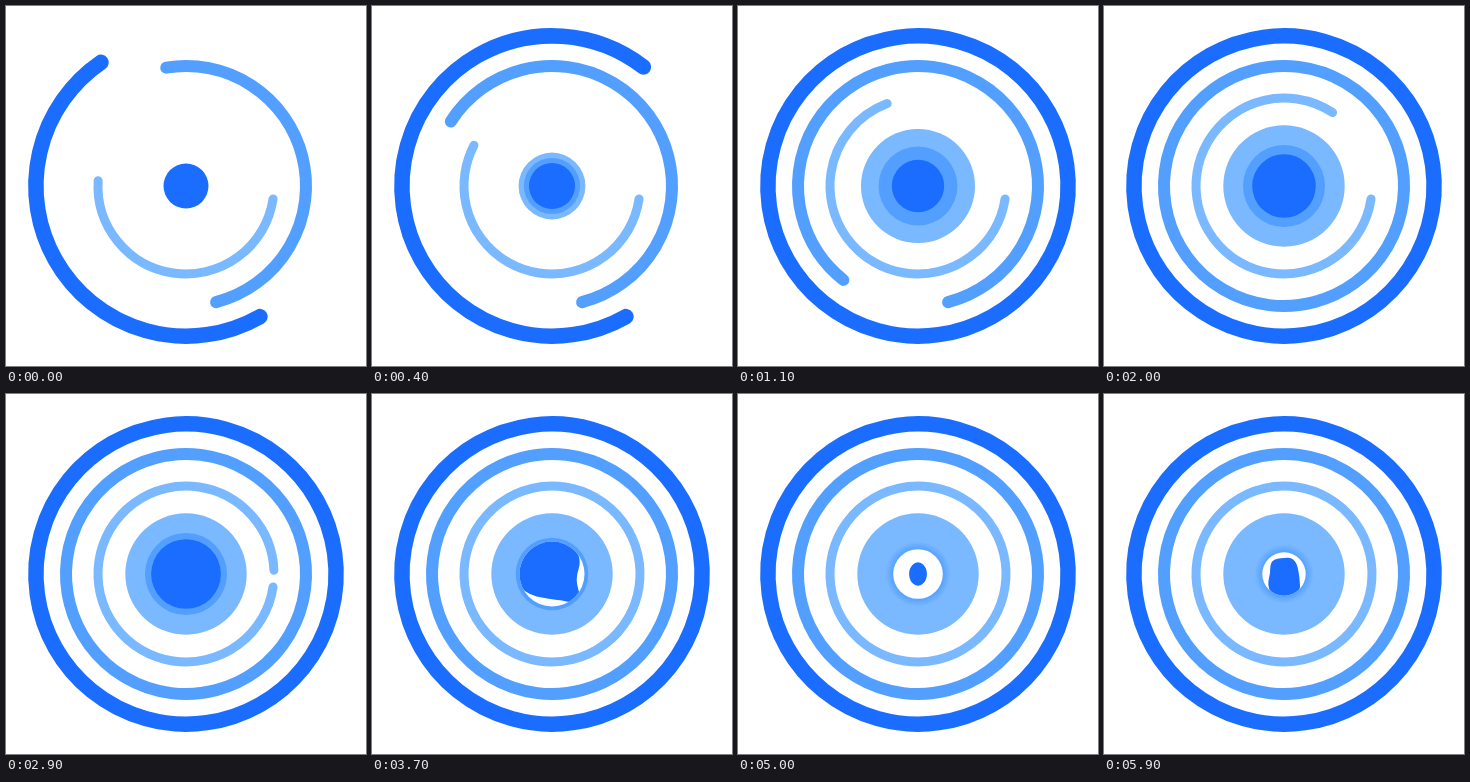
Write an HTML page with a canvas that moves like this. It is 360x360 px and loops after 6 s.

```html
<!DOCTYPE html>
<html lang="en">
<head>
<meta charset="utf-8">
<title>Rings</title>
<style>
  html, body { margin: 0; height: 100%; overflow: hidden; background: #fff; }
  canvas { display: block; width: 360px; height: 360px; }
</style>
</head>
<body>
<canvas id="stage" width="360" height="360"></canvas>
<script>
const LOOP = 6000, STEP = 100, C = 180;
const DARK = '#1a6dff', MID = '#529fff', LIGHT = '#7ab8ff';
const ctx = document.getElementById('stage').getContext('2d');
const rad = deg => deg * Math.PI / 180;
const mix = (a, b, k) => a + (b - a) * k;
const unit = (t, from, to) => Math.min(1, Math.max(0, (t - from) / (to - from)));

// Arcs sweep out from 175 degrees and keep what they have covered.
const arcs = [
  { r: 150.1, width: 15.5, color: DARK, from: 60.5, speed: 180 },
  { r: 120, width: 12, color: MID, from: 75.5, speed: -120 },
  { r: 88, width: 9, color: LIGHT, from: 8.5, speed: 60 }
];

// Core outline: time in seconds and radii at equal angles, clockwise from the right.
const shapes = [
  [3.4, Array(16).fill(36)],
  [3.7, [25, 26.5, 44, 28.5, 25.5, 25.5, 30, 35, 35, 35, 35, 35, 35, 35, 35, 31]],
  [5, [9, 9.3, 10.2, 11.4, 12, 11.4, 10.2, 9.3, 9, 9.3, 10.2, 11.4, 12, 11.4, 10.2, 9.3]],
  [5.9, [15, 17, 23, 24, 24, 24, 22, 17, 14, 15, 18, 17, 16, 18, 17, 15]]
];

function disc(r, fill) {
  ctx.fillStyle = fill;
  ctx.beginPath();
  ctx.arc(C, C, r, 0, 2 * Math.PI);
  ctx.fill();
}

function drawArc({ r, width, color, from, speed }, t) {
  const sweep = Math.min(360, 175 + Math.abs(speed) * t);
  const dir = Math.sign(speed);
  ctx.lineWidth = width;
  ctx.strokeStyle = color;
  ctx.beginPath();
  ctx.arc(C, C, r, rad(from), rad(from + dir * sweep), dir < 0);
  ctx.stroke();
}

function halo(r, alpha) {
  const g = ctx.createRadialGradient(C, C, r, C, C, r + 7);
  g.addColorStop(0, `rgba(82,159,255,${0.8 * alpha})`);
  g.addColorStop(1, 'rgba(82,159,255,0)');
  disc(r + 7, g);
}

function blob(t) {
  const i = Math.max(1, shapes.findIndex(s => t <= s[0]));
  const [t0, a] = shapes[i - 1], [t1, b] = shapes[i];
  const k = unit(t, t0, t1), n = a.length;
  const pts = a.map((v, j) => {
    const r = mix(v, b[j], k), q = 2 * Math.PI * j / n;
    return [C + r * Math.cos(q), C + r * Math.sin(q)];
  });
  ctx.beginPath();
  pts.forEach(([x, y], j) => {
    const [nx, ny] = pts[(j + 1) % n];
    if (!j) {
      const [px, py] = pts[n - 1];
      ctx.moveTo((px + x) / 2, (py + y) / 2);
    }
    ctx.quadraticCurveTo(x, y, (x + nx) / 2, (y + ny) / 2);
  });
  ctx.fillStyle = DARK;
  ctx.fill();
}

function drawCore(t) {
  const core = 22.5 + 6.2 * (1 - Math.cos(2 * Math.PI * t / 6));
  disc(Math.min(60.7, 19.9 + 33.75 * t), LIGHT);

  const grown = Math.min(41, 21.6 + 16.25 * t);
  const ring = t < 3.7 ? mix(grown, 36, unit(t, 3, 3.7)) : core + 3;
  const fade = unit(t, 3.7, 4.5);
  if (fade) halo(core, fade);
  ctx.globalAlpha = 1 - fade;
  disc(ring, MID);
  ctx.globalAlpha = 1;

  if (t <= 3.4) return disc(core, DARK);
  const hole = core - 0.8;
  disc(hole, '#fff');
  ctx.save();
  ctx.beginPath();
  ctx.arc(C, C, hole, 0, 2 * Math.PI);
  ctx.clip();
  blob(t);
  ctx.restore();
}

function draw(now) {
  const t = Math.floor(now % LOOP / STEP) * STEP / 1000;
  ctx.clearRect(0, 0, 360, 360);
  ctx.lineCap = 'round';
  arcs.forEach(a => drawArc(a, t));
  drawCore(t);
}

const start = performance.now();
function tick() {
  draw(performance.now() - start);
  requestAnimationFrame(tick);
}
tick();
</script>
</body>
</html>
```
